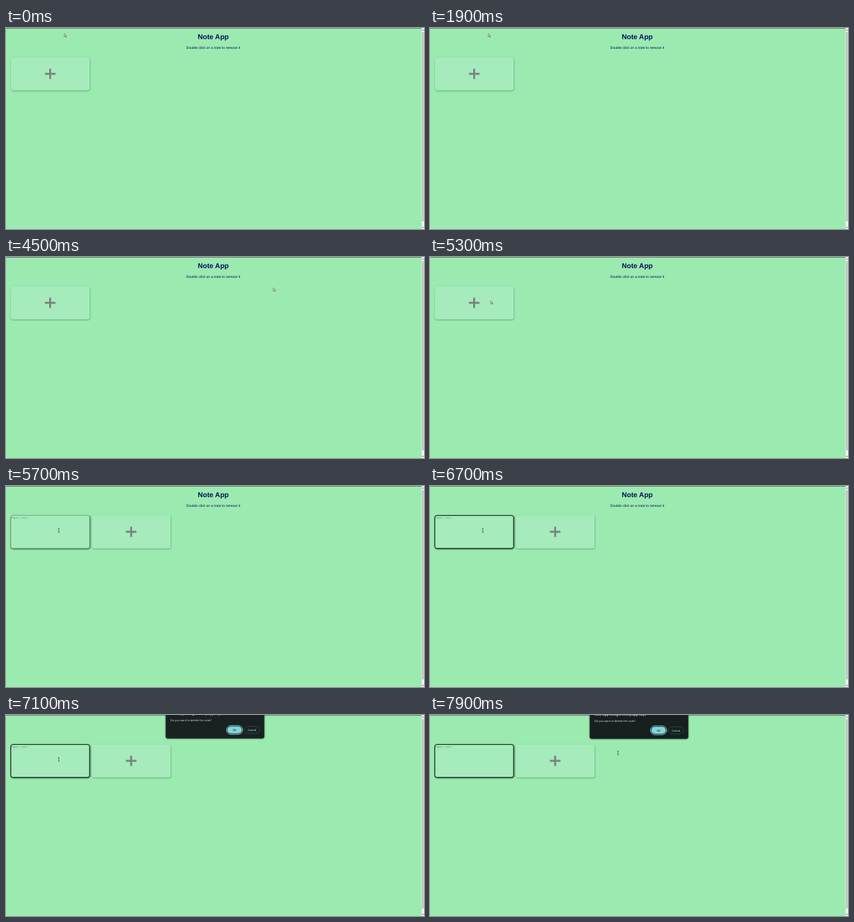
An HTML page for the animation above (8000 ms loop, 600 by 289 pixels).

```html
<!DOCTYPE html>
<html lang="en">
<head>
<meta charset="utf-8">
<title>Note App</title>
<style>
  html, body { margin: 0; width: 100%; height: 100%; overflow: hidden; background: #9beab0; }
  svg { display: block; width: 100vw; height: 100vh; }
  text { font-family: "Liberation Sans", Arial, sans-serif; text-rendering: geometricPrecision; }
  .ui { font-family: "Open Sans", "Noto Sans", sans-serif; }
  .shade { filter: blur(1.2px); }
</style>
</head>
<body>
<svg viewBox="0 0 600 289">
  <defs>
    <g id="addCard">
      <rect class="shade" x="7.3" y="43.2" width="113" height="47.4" rx="3" fill="#28503a" opacity=".5"/>
      <rect x="7" y="42.3" width="113" height="47.4" rx="3" fill="#a5ebbc"/>
      <path d="M55.8 65.8h15.2M63.4 58.4v14.8" stroke="#7c807e" stroke-width="2.7"/>
    </g>
  </defs>
  <rect width="600" height="289" fill="#9beab0"/>
  <g fill="#07105f" text-anchor="middle">
    <text x="297.5" y="16.2" font-size="10.1" font-weight="700">Note App</text>
    <text x="297.5" y="30" font-size="5.05">Double click on a note to remove it</text>
  </g>

  <g id="note">
    <rect class="shade" x="7.2" y="42.9" width="113.4" height="47.5" rx="3" fill="#0a2014" opacity=".95"/>
    <rect x="7" y="42.3" width="113" height="47.4" rx="3" fill="#a5ebbc" stroke="#4d7a5e" stroke-width=".4"/>
    <text x="7.6" y="46.8" font-size="3.85" fill="#6f8f7b" style="font-family:'Liberation Mono',monospace">Empty note</text>
    <rect id="focus" x="6.9" y="42.4" width="113.1" height="47.3" rx="3" fill="none" stroke="#101c16" stroke-width=".95"/>
  </g>
  <use id="add" href="#addCard"/>

  <rect width="600" height=".8" fill="#56705f"/>
  <rect x="596.7" width="3.3" height="289" fill="#f3f4f3"/>
  <rect x="597.2" y="6" width="2.4" height="272" fill="#bcc0bd"/>
  <path d="M597.2 3.6l1.2-1.6 1.2 1.6zM597.2 286l1.2 1.6 1.2-1.6z" fill="#555"/>

  <g id="dialog">
    <rect class="shade" x="229" y="-10" width="142" height="44.8" rx="3.5" fill="#0c1c14" opacity=".55"/>
    <rect x="229.3" y="-10" width="141.4" height="44.3" rx="3.2" fill="#171f1f"/>
    <g fill="#e4e9e8">
      <text class="ui" x="236" y=".7" font-size="4.75" font-weight="600">note-app-design.netlify.app says</text>
      <text class="ui" x="236" y="9.5" font-size="3.93">Do you want to delete this note?</text>
    </g>
    <rect x="316.5" y="15.7" width="23.2" height="12.6" rx="6.3" fill="#171f1f" stroke="#8edce0" stroke-width=".9"/>
    <rect x="317.7" y="16.9" width="20.8" height="10.2" rx="5.1" fill="#82d6da"/>
    <rect x="342.3" y="16.9" width="21.8" height="10.2" rx="5.1" fill="none" stroke="#2e5356" stroke-width=".7"/>
    <g font-size="3.8" font-weight="600" text-anchor="middle">
      <text class="ui" x="328.1" y="23.5" fill="#123c40">OK</text>
      <text class="ui" x="353.1" y="23.5" fill="#93d8dc">Cancel</text>
    </g>
  </g>

  <path id="arrow" d="M0 0v4.5l1-.9.7 1.6.8-.35-.7-1.5h1.4z" fill="#fff" stroke="#222" stroke-width=".5"/>
  <path id="beam" d="M-1.1-2.6h.8l.3.3.3-.3h.8M0-2.3v4.6M-1.1 2.6h.8l.3-.3.3.3h.8" fill="none" stroke="#26372d" stroke-width=".65"/>
</svg>
<script>
const LOOP = 8000, STEP = 100;
const ADDED = 5400, FOCUSED = 6300, DIALOG = 6800, DIALOG_MS = 320;
const $ = id => document.getElementById(id);
const clamp = v => Math.max(0, Math.min(1, v));

// pointer path: time, x, y
const path = [
  [0, 83.8, 8], [2500, 83.8, 8], [2700, 73, 22], [2900, 150, 50], [3100, 345, 76],
  [3300, 444.7, 83.8], [3900, 445, 84], [4200, 430, 73], [4500, 383.8, 44.4],
  [4800, 308, 31], [5000, 215, 42], [5200, 112, 60], [5400, 75.8, 64],
  [7200, 75.8, 64], [7500, 150, 60], [7900, 269.8, 54.6], [8000, 282, 51]
];

// Hermite curve through the points, flat where the pointer rests
function slope(i, k) {
  const a = path[i - 1], b = path[i], c = path[i + 1];
  if (!a || !c || (b[k] - a[k]) * (c[k] - b[k]) <= 0) return 0;
  const before = (b[k] - a[k]) / (b[0] - a[0]), after = (c[k] - b[k]) / (c[0] - b[0]);
  return 2 * before * after / (before + after);
}

function pointer(t) {
  let i = 0;
  while (i < path.length - 2 && t >= path[i + 1][0]) i++;
  const a = path[i], b = path[i + 1], d = b[0] - a[0], u = (t - a[0]) / d;
  const at = k => {
    const s = u * u * (3 - 2 * u);
    return a[k] + (b[k] - a[k]) * s
      + d * u * (1 - u) * ((1 - u) * slope(i, k) - u * slope(i + 1, k));
  };
  return [at(1), at(2)];
}

function show(id, on) {
  $(id).setAttribute('visibility', on ? 'visible' : 'hidden');
}

function place(id, x, y) {
  $(id).setAttribute('transform', `translate(${x.toFixed(2)} ${y.toFixed(2)})`);
}

function draw(time) {
  const t = Math.floor(time % LOOP / STEP) * STEP;
  const added = t >= ADDED;
  show('note', added);
  show('focus', t >= FOCUSED);
  place('add', added ? 116.3 : 0, 0);

  const p = clamp((t - DIALOG) / DIALOG_MS);
  $('dialog').setAttribute('opacity', 1 - (1 - p) ** 1.4);
  place('dialog', 0, -8 * (1 - p));

  const [x, y] = pointer(t);
  show('arrow', !added);
  show('beam', added);
  place(added ? 'beam' : 'arrow', x, y);
}

const start = performance.now();
function tick() {
  draw(performance.now() - start);
  requestAnimationFrame(tick);
}
tick();
</script>
</body>
</html>
```
